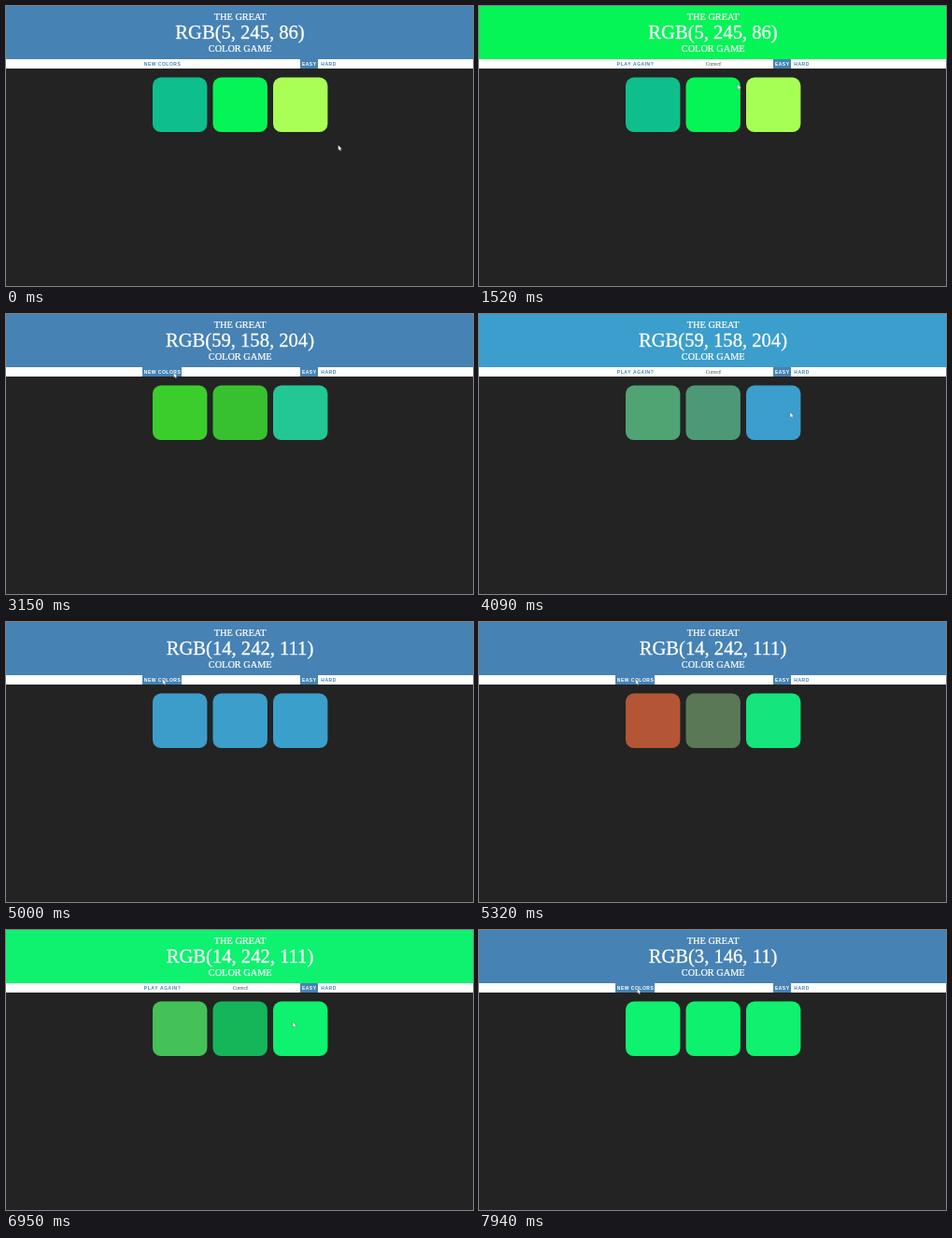
Recreate the animation shown at these times as an HTML page. Size 500 by 300 pixels, loop 8000 ms.

```html
<!DOCTYPE html>
<html lang="en">
<head>
<meta charset="utf-8">
<title>Color game</title>
<style>
  html, body { margin: 0; width: 100%; height: 100%; overflow: hidden; background: #232323; }
  svg { display: block; width: 100vw; height: 100vh; }
  .serif { font-family: "Liberation Serif", "Times New Roman", serif; text-anchor: middle; }
  .head { fill: #fff; font-size: 10.3px; stroke: #fff; stroke-width: .22px; }
  .big { font-size: 20.6px; stroke-width: .3px; }
  .note { font-size: 5.1px; fill: #444; }
  .btn { font: 700 5px "Liberation Sans", Arial, sans-serif; letter-spacing: .5px; font-kerning: none; }
</style>
</head>
<body>
<svg viewBox="0 0 500 300" xmlns="http://www.w3.org/2000/svg">
  <rect width="500" height="300" fill="#232323"/>
  <rect id="header" width="500" height="57"/>
  <text class="serif head" x="250.7" y="15.2">THE GREAT</text>
  <text class="serif head big" id="goal" x="250.5" y="35.4"></text>
  <text class="serif head" x="250.7" y="49">COLOR GAME</text>
  <rect y="57" width="500" height="10" fill="#fff"/>
  <rect id="resetBg" x="146" y="57" width="42" height="10"/>
  <text class="btn" id="reset" x="147.8" y="64"></text>
  <text class="serif note" id="note" x="251.3" y="64"></text>
  <rect x="315" y="57" width="19" height="10" fill="#4682b4"/>
  <text class="btn" x="316.9" y="64" fill="#fff">EASY</text>
  <text class="btn" x="337.3" y="64" fill="#4682b4">HARD</text>
  <g id="squares"></g>
  <path id="cursor" d="M0 0V5.6L1.3 4.5 2.2 6.4 3.2 6 2.4 4.2H4Z" fill="#fff" stroke="#222" stroke-width=".25"/>
</svg>
<script>
const LOOP = 8000, FADE = 600, HOVER = 300;
const $ = id => document.getElementById(id);

const steel = [70, 130, 180], white = [255, 255, 255], dark = [35, 35, 35];
const lime = [5, 245, 86], blue = [59, 158, 204], mint = [14, 242, 111], leaf = [3, 146, 11];
const rust = [202, 73, 26], olive = [95, 112, 65];
const rgb = c => `rgb(${c.map(Math.round).join(', ')})`;

// What the page shows after each click
const fresh = (at, goal, squares, note = '') =>
  ({ at, goal, squares, note, header: steel, label: 'NEW COLORS' });
const won = (at, goal) =>
  ({ at, goal, squares: [goal, goal, goal], note: 'Correct!', header: goal, label: 'PLAY AGAIN?' });

const scenes = [
  fresh(0, lime, [[14, 190, 140], lime, [169, 255, 85]]),
  won(1500, lime),
  fresh(2965, blue, [[105, 169, 6], [99, 147, 16], blue]),
  won(3900, blue),
  fresh(4990, mint, [rust, olive, mint]),
  fresh(5750, mint, [rust, dark, mint], 'Try Again'),
  won(6698, mint),
  fresh(7935, leaf, [leaf, steel, rust])
];

// Pointer trips between resting places
const rest = [355.7, 149];
const trip = (from, to, x, y, reset = false) => ({ from, to, spot: [x, y], reset });
const trips = [
  trip(430, 740, 276.7, 83.8),
  trip(2050, 2500, 179.5, 62.5, true),
  trip(3200, 3630, 333, 105.2),
  trip(4350, 4800, 167.7, 61.2, true),
  trip(5430, 5730, 270.8, 109.7),
  trip(6100, 6400, 307, 98.5),
  trip(7220, 7700, 169.5, 62.5, true)
];

const clamp = v => Math.min(1, Math.max(0, v));
const blend = (a, b, k) => a.map((v, i) => v + (b[i] - v) * k);
const smooth = k => k * k * (3 - 2 * k);

// cubic-bezier(.25, .1, .25, 1)
function ease(x) {
  x = clamp(x);
  const bez = (a, b, s) => 3 * a * s * (1 - s) ** 2 + 3 * b * s * s * (1 - s) + s ** 3;
  let lo = 0, hi = 1;
  for (let i = 0; i < 24; i++) {
    const mid = (lo + hi) / 2;
    if (bez(.25, .25, mid) < x) lo = mid; else hi = mid;
  }
  return bez(.1, 1, lo);
}

const pointer = t => trips.reduce((pos, { from, to, spot }) =>
  blend(pos, spot, smooth(clamp((t - from) / (to - from)))), rest);

// The button lights up shortly before the pointer settles, and fades once it leaves
const hoverAt = t => trips.reduce((h, { from, to, reset }) =>
  reset ? Math.max(h, ease((t - to + 100) / HOVER)) : h * (1 - ease((t - from - 50) / HOVER)), 0);

const squares = [0, 1, 2].map(i => {
  const r = document.createElementNS('http://www.w3.org/2000/svg', 'rect');
  const attrs = { x: 157 + i * 64.5, y: 76.6, width: 58.4, height: 58.4, rx: 8.8 };
  for (const key in attrs) r.setAttribute(key, attrs[key]);
  return $('squares').appendChild(r);
});

function setText(id, text) {
  if ($(id).textContent !== text) $(id).textContent = text;
}

function draw(t) {
  const n = scenes.filter(s => s.at <= t).length - 1;
  const now = scenes[n], before = scenes[Math.max(0, n - 1)];

  $('header').setAttribute('fill', rgb(now.header));
  setText('goal', rgb(now.goal).toUpperCase());
  setText('reset', now.label);
  setText('note', now.note);

  const k = ease((t - now.at) / FADE);
  squares.forEach((sq, i) =>
    sq.setAttribute('fill', rgb(blend(before.squares[i], now.squares[i], k))));

  const h = hoverAt(t);
  $('resetBg').setAttribute('fill', rgb(blend(white, steel, h)));
  $('reset').setAttribute('fill', rgb(blend(steel, white, h)));
  $('cursor').setAttribute('transform', `translate(${pointer(t)})`);
}

const start = performance.now();
function tick() {
  draw((performance.now() - start) % LOOP);
  requestAnimationFrame(tick);
}
tick();
</script>
</body>
</html>
```
